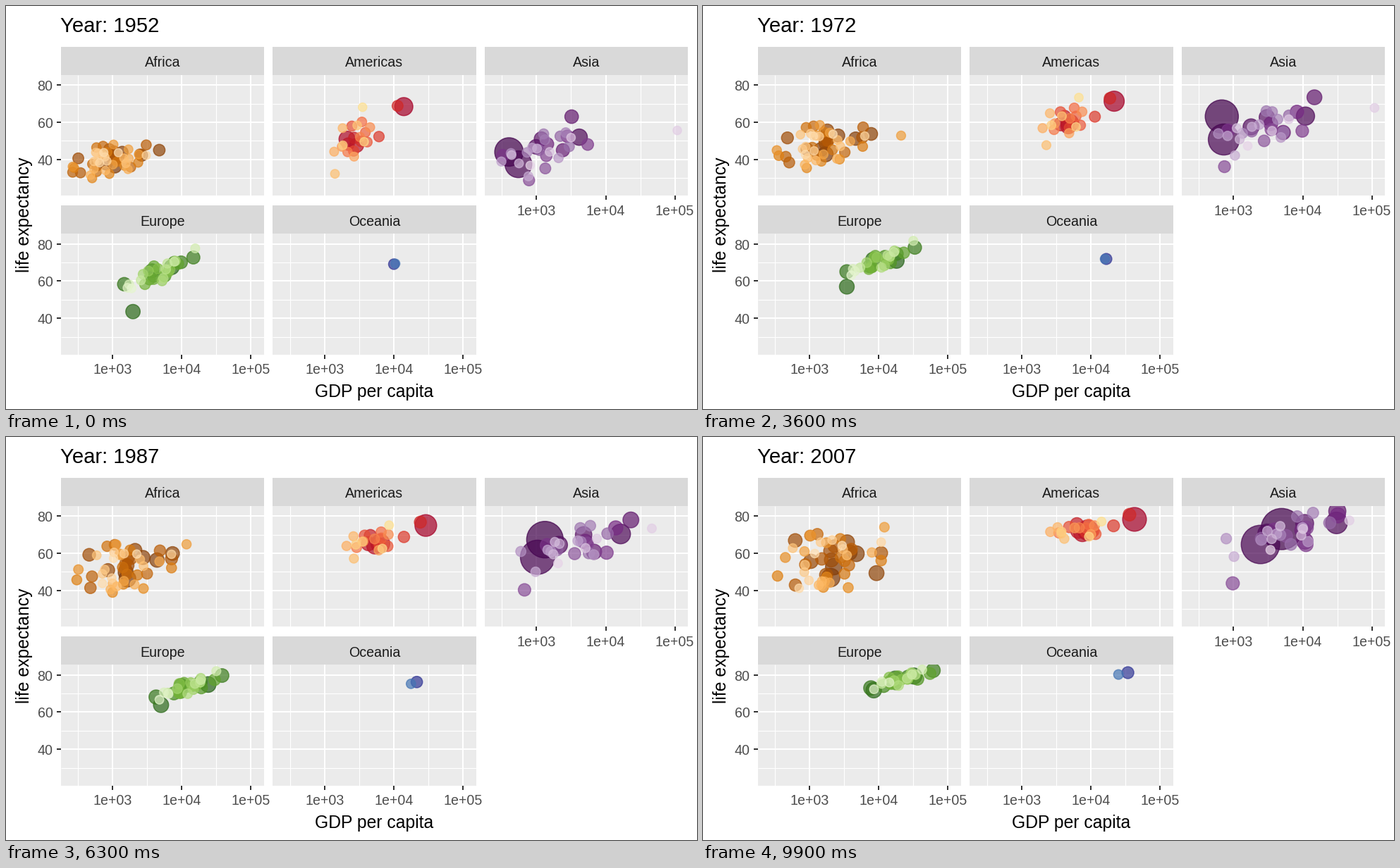
These frames come from a looping animation (980 by 572 pixels, 10000 ms). A matplotlib script:

```python
import numpy as np
import matplotlib.pyplot as plt
from matplotlib.animation import FuncAnimation
from matplotlib.colors import to_rgb
from matplotlib.patches import Rectangle

plt.rcParams["font.family"] = "Liberation Sans"
W, H, DPI = 980, 572, 100
PX = 72 / DPI
FRAMES, INTERVAL = 100, 100
FIRST, LAST = 1952, 2007
KEY_YEARS = (1952, 1972, 1992, 2007)
PANEL_W, PANEL_H = 288.5, 171.5
X_LO, X_UNIT = 2.2487, 98.1
Y_HI, Y_UNIT = 85.55, 2.64
WANDER = 0.6    # how far dots drift within their cloud
REACH = 1.9     # cloud limit, in spreads

fig = plt.figure(figsize=(W / DPI, H / DPI), dpi=DPI, facecolor="white")
ax = fig.add_axes([0, 0, 1, 1])
ax.set(xlim=(0, W), ylim=(H, 0))
ax.axis("off")


def text(x, y, s, size, color="black", **kw):
    return ax.text(x, y, s, fontsize=size * PX, color=color, va="baseline", **kw)


def rect(x, y, w, h, color):
    return ax.add_patch(Rectangle((x, y), w, h, fc=color, ec="none", lw=0))


def line(xs, ys, width, color="white"):
    ax.plot(xs, ys, color=color, lw=width * PX, solid_capstyle="butt", zorder=1.5)


def along(path, year):
    """Log GDP and life expectancy on a path of (gdp, life) key points."""
    gdp, life = zip(*path)
    return (np.interp(year, KEY_YEARS, np.log10(gdp)),
            np.interp(year, KEY_YEARS, life))


def blend(pair, t):
    return pair[0] + (pair[1] - pair[0]) * t


class Panel:
    def __init__(self, name, col, row, x_axis=False):
        self.x0, self.y0 = 77.5 + 300.6 * col, 97.5 + 225.5 * row
        x0, y0 = self.x0, self.y0
        x1, y1 = x0 + PANEL_W, y0 + PANEL_H
        rect(x0, y0 - 40, PANEL_W, 40, "#D9D9D9")
        self.area = rect(x0, y0, PANEL_W, PANEL_H, "#EBEBEB")
        text(x0 + PANEL_W / 2, y0 - 11.5, name, 19.6, "#1A1A1A", ha="center")
        for v in (2.5, 3.5, 4.5):
            line([self.px(v)] * 2, [y0, y1], 1.1)
        for v in (30, 50, 70):
            line([x0, x1], [self.py(v)] * 2, 1.1)
        for v in (3, 4, 5):
            x = self.px(v)
            line([x, x], [y0, y1], 2)
            if x_axis:
                line([x, x], [y1, y1 + 6], 2, "#333333")
                text(x, y1 + 28, f"1e+0{v}", 19.6, "#4D4D4D", ha="center")
        for v in (40, 60, 80):
            y = self.py(v)
            line([x0, x1], [y, y], 2)
            if col == 0:
                line([x0 - 6, x0], [y, y], 2, "#333333")
                text(x0 - 11, y + 8, v, 19.6, "#4D4D4D", ha="right")

    def px(self, log_gdp):
        return self.x0 + (log_gdp - X_LO) * X_UNIT

    def py(self, life):
        return self.y0 + (Y_HI - life) * Y_UNIT

    def fill(self, n, ramp, pops, decay, growth, trend, gdp_spread=(0, 0),
             life_spread=(0, 0), corr=0, leads=None, seed=0):
        """A cloud of n dots, by falling population, that follows a trend.

        pops: the largest populations, the last one starting an exponential
        fall-off; leads: rank -> path for dots that travel on their own.
        """
        self.trend, self.corr, self.leads = trend, corr, leads or {}
        self.gdp_spread, self.life_spread = gdp_spread, life_spread
        self.noise = np.random.default_rng(seed).normal(size=(2, 2, n))

        rank = np.linspace(0, 1, n)
        pop = pops[-1] * np.exp(-decay * rank)
        pop[:len(pops)] = pops
        self.sizes = [self.diameter(pop / growth), self.diameter(pop)]

        stops = np.array([to_rgb("#" + c) for c in ramp.split()])
        at = np.linspace(0, 1, len(stops))
        rgba = [(*(np.interp(r, at, c) for c in stops.T), 0.7) for r in rank]
        self.dots = ax.scatter(rank, rank, s=1, facecolors=rgba, edgecolors=rgba,
                               linewidths=1.5 * PX, zorder=3)
        self.dots.set_clip_path(self.area)

    @staticmethod
    def diameter(pop):
        return 4.742 * (2 + 10 * np.sqrt(pop / 1319)) + 1.575

    def update(self, year):
        t = (year - FIRST) / (LAST - FIRST)
        a, b = self.noise
        wealth, health = np.clip(a * np.cos(WANDER * t) + b * np.sin(WANDER * t),
                                 -REACH, REACH)
        health = self.corr * wealth + np.sqrt(1 - self.corr ** 2) * health
        gdp, life = along(self.trend, year)
        gdp = gdp + blend(self.gdp_spread, t) * wealth
        life = life + blend(self.life_spread, t) * health
        for rank, path in self.leads.items():
            gdp[rank], life[rank] = along(path, year)
        self.dots.set_offsets(np.column_stack([self.px(gdp), self.py(life)]))
        self.dots.set_sizes((blend(self.sizes, t) * PX) ** 2)


africa = Panel("Africa", 0, 0)
africa.fill(
    52, "7F3B08 B35806 E08214 FDB863 FEE0B6", pops=(135, 90), decay=5, growth=3.6,
    trend=[(900, 39.5), (1450, 47.5), (1350, 53.6), (1650, 55)],
    gdp_spread=(0.28, 0.43), life_spread=(4.6, 9), corr=0.35, seed=4,
    leads={0: [(1077, 36.3), (1698, 42.8), (1620, 47.5), (2014, 46.9)],
           4: [(4725, 45), (7766, 53.7), (7225, 61.9), (9270, 49.3)],
           32: [(2388, 42.7), (21011, 52.8), (9640, 68.8), (12057, 74)]})

americas = Panel("Americas", 1, 0)
americas.fill(
    25, "A50026 D73027 F46D43 FDAE61 FEE090", pops=(301, 190, 109, 60), decay=3.8,
    growth=2.4, trend=[(3300, 53), (5400, 62.5), (6300, 69.5), (8500, 73.5)],
    gdp_spread=(0.2, 0.27), life_spread=(9, 4), corr=0.55, seed=7,
    leads={0: [(13990, 68.4), (21806, 71.3), (32004, 76.1), (42952, 78.2)],
           1: [(2109, 50.9), (4986, 59.5), (6950, 67.1), (9066, 72.4)],
           5: [(11367, 68.8), (18971, 72.9), (26343, 78), (36319, 80.7)]})

asia = Panel("Asia", 2, 0, x_axis=True)
asia.fill(
    33, "40004B 762A83 9970AB C2A5CF E7D4E8", pops=(1319, 1110, 224), decay=5,
    growth=2.6, trend=[(1500, 46.5), (3200, 57.5), (4600, 67), (7000, 71)],
    gdp_spread=(0.36, 0.5), life_spread=(8.5, 6), corr=0.7, seed=11,
    leads={0: [(400, 44), (677, 63.1), (1656, 68.7), (4959, 73)],
           1: [(547, 37.4), (724, 50.7), (1164, 60.2), (2452, 64.7)],
           5: [(3217, 63), (14779, 73.4), (26825, 79.4), (31656, 82.6)],
           12: [(779, 28.8), (740, 36.1), (649, 41.7), (975, 43.8)],
           31: [(108382, 55.6), (109348, 67.7), (34933, 75.2), (47307, 77.6)]})

europe = Panel("Europe", 0, 1, x_axis=True)
europe.fill(
    30, "276419 4D9221 7FBC41 B8E186 E6F5D0", pops=(82,), decay=4.2, growth=1.4,
    trend=[(4800, 64.5), (10700, 70.8), (13500, 74.3), (22000, 77.6)],
    gdp_spread=(0.27, 0.24), life_spread=(5, 3), corr=0.85, seed=2,
    leads={0: [(7144, 67.5), (18016, 71), (26505, 76.1), (32170, 79.4)],
           1: [(1969, 43.6), (3451, 57), (5678, 66.1), (8458, 71.8)]})

oceania = Panel("Oceania", 1, 1, x_axis=True)
oceania.fill(
    2, "313695 4575B4", pops=(20, 4), decay=0, growth=2.2,
    trend=[(10040, 69.1), (16789, 71.9), (23425, 77.6), (34435, 81.2)],
    leads={1: [(10557, 69.4), (16046, 71.9), (18363, 76.3), (25185, 80.2)]})

panels = [africa, americas, asia, europe, oceania]
title = text(76.5, 37, "", 29.3)
text(522, 555, "GDP per capita", 24.7, ha="center")
text(33, 296, "life expectancy", 24.8, ha="center", rotation=90,
     rotation_mode="anchor")


def update(i):
    year = FIRST + (LAST - FIRST) * i / (FRAMES - 1)
    title.set_text(f"Year: {round(year)}")
    for p in panels:
        p.update(year)
    return [title] + [p.dots for p in panels]


anim = FuncAnimation(fig, update, frames=FRAMES, interval=INTERVAL,
                     repeat=True, repeat_delay=0)
plt.show()
```
